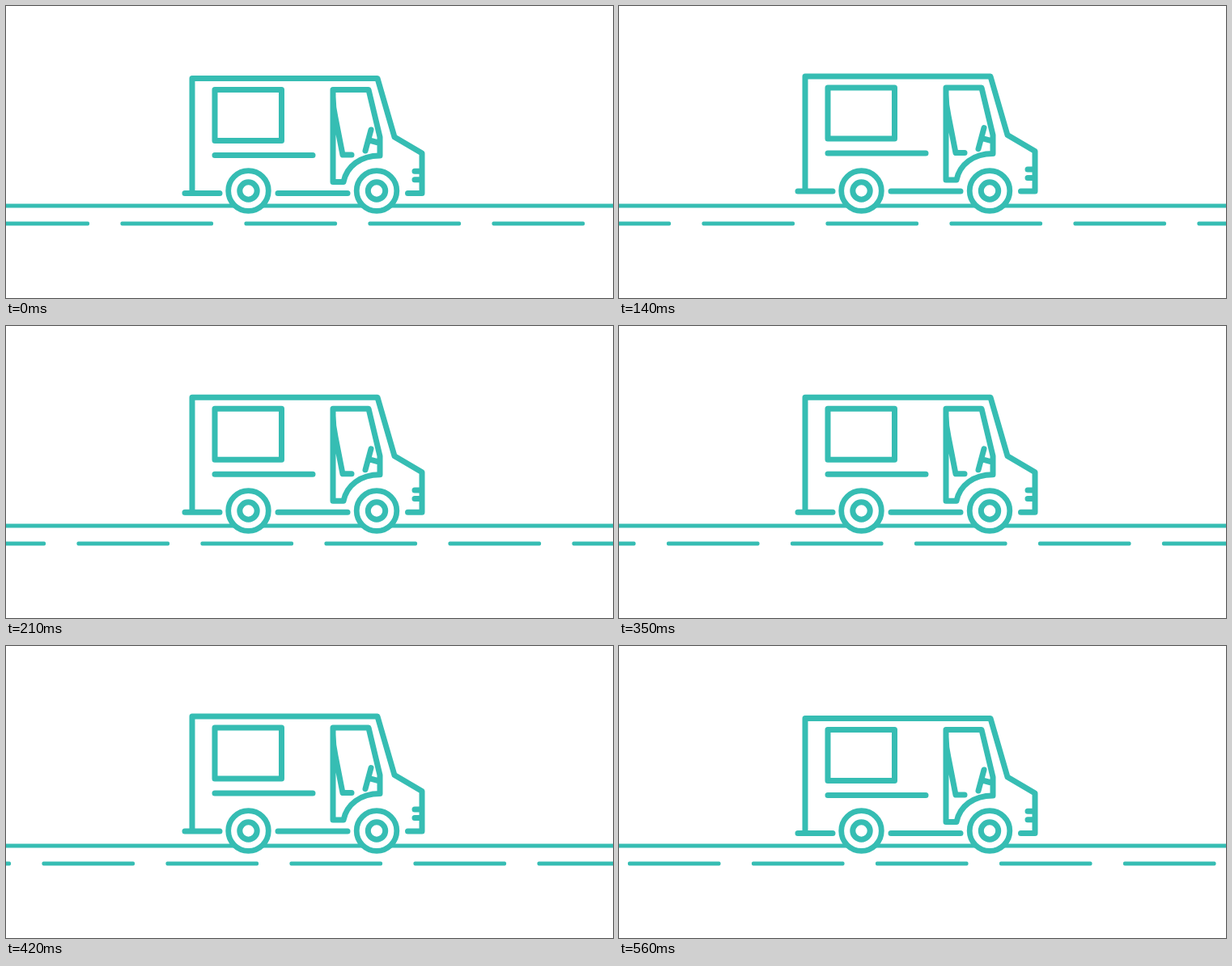
Recreate the animation shown at these times as an HTML page with a canvas. Size 750 px wide and 361 px high, loop 0.63 s.

```html
<!DOCTYPE html>
<html lang="en">
<head>
<meta charset="utf-8">
<title>Van on the road</title>
<style>
html, body { margin: 0; width: 100%; height: 100%; overflow: hidden; background: #fff; }
canvas { display: block; }
</style>
</head>
<body>
<canvas id="stage" width="750" height="361"></canvas>
<script>
const ctx = document.getElementById('stage').getContext('2d');
const TEAL = '#36bdb3';
const STEP = 70, STEPS = 9;
const DASH = 114.5, PERIOD = 153;
// Road travel at each step; one loop moves by exactly one period
const travel = [0, 21, 39, 54, 68, 82.5, 97, 111.5, 130.5];

const van = new Path2D(`
  M221 231.5H264 M336 231.5H422
  M230 231.5V89.5H459L480 162L514 182V231.5H496.5
  M258 103.5H340.5V166.5H258Z
  M258 184.5H379
  M404 103.5H448L462 162V185C438 185 421 198 417 217.5H404Z
  M404 112Q404 125 407 138L416 184H427
  M451 153L444 179 M449 166L460 169
  M505 204.3H514 M505 214.8H514`);

function drawRoad(shift) {
  ctx.fillStyle = TEAL;
  ctx.fillRect(0, 244.5, 750, 5);
  for (let x = -11.5 - shift; x < 750; x += PERIOD) {
    ctx.beginPath();
    ctx.roundRect(x, 266.5, DASH, 5, 1.8);
    ctx.fill();
  }
}

function drawVan(lift) {
  ctx.save();
  ctx.translate(0, -lift);
  ctx.strokeStyle = TEAL;
  ctx.lineWidth = 7;
  ctx.lineCap = ctx.lineJoin = 'round';
  ctx.stroke(van);
  ctx.restore();
}

function ring(x, y, r, width) {
  ctx.beginPath();
  ctx.arc(x, y, r, 0, Math.PI * 2);
  ctx.fillStyle = '#fff';
  ctx.fill();
  ctx.lineWidth = width;
  ctx.strokeStyle = TEAL;
  ctx.stroke();
}

function drawWheel(x) {
  ring(x, 228.5, 24.8, 6.8);
  ring(x, 228.5, 10.7, 7);
}

function draw(now) {
  const step = Math.floor(now / STEP) % STEPS;
  const lift = 1.2 * (2 - Math.abs(step % 4 - 2));
  ctx.fillStyle = '#fff';
  ctx.fillRect(0, 0, 750, 361);
  drawRoad(travel[step]);
  drawVan(lift);
  drawWheel(299.5);
  drawWheel(458);
}

let start;
function tick(now) {
  start ??= now;
  draw(now - start);
  requestAnimationFrame(tick);
}
draw(0);
requestAnimationFrame(tick);
</script>
</body>
</html>
```
